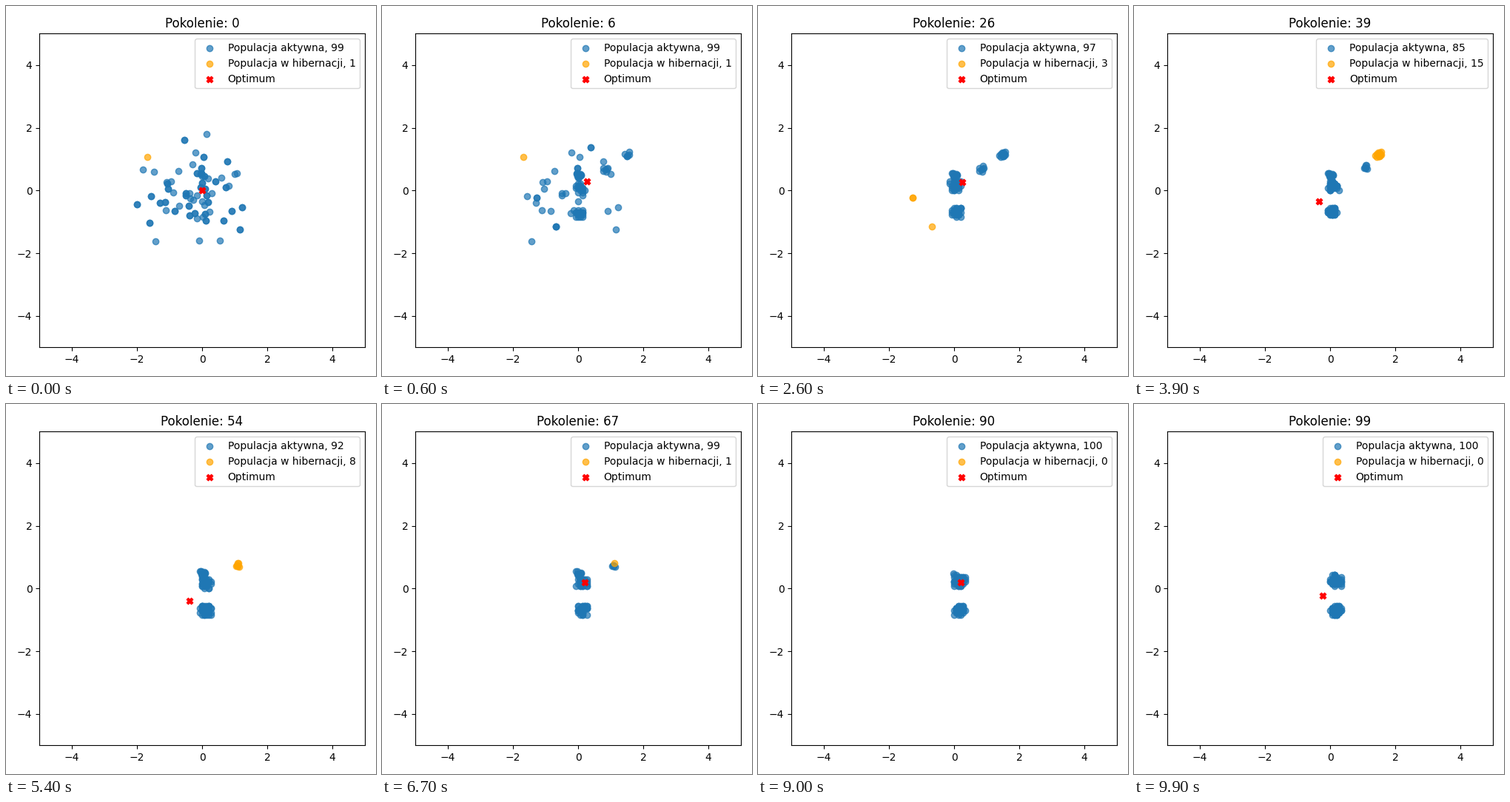
Write a matplotlib script that moves like this. It is 500x500 px and loops after 10 s.

```python
import matplotlib.pyplot as plt
import numpy as np
from matplotlib.animation import FuncAnimation

SIZE = 100      # individuals
GENS = 100      # generations
FOUNDERS = 66   # distinct starting points, the rest are copies
RENEW = 12      # generations between new offspring in a core group
GRID = 0.07     # gene resolution
SLEEP, WAKE = 1.9, 1.05   # distances from the optimum

rng = np.random.default_rng(7)
cloud = np.clip(rng.normal(0, [0.85, 0.8], (FOUNDERS, 2)), -2, 2)
cloud = cloud[np.arange(SIZE) % FOUNDERS]
leave = 1 + (15 * rng.random(SIZE) ** 2).astype(int)
noise = np.clip(rng.normal(size=(GENS // RENEW + 2, SIZE, 2)), -1.8, 1.8)
phase = rng.integers(RENEW, size=SIZE)

# Side niches: x, y, spread, members, born, first and last death
NICHES = [
    (0.00, 0.50, 0.05, 12, 4, 60, 92),
    (1.50, 1.16, 0.06, 15, 5, 40, 52),
    (0.86, 0.69, 0.05, 7, 5, 28, 36),
    (1.08, 0.73, 0.05, 8, 30, 66, 82),
    (0.39, 1.37, 0.00, 2, 3, 16, 20),
    (-1.27, -0.22, 0.00, 2, 4, 33, 35),
    (-0.68, -1.15, 0.00, 3, 5, 20, 32),
    (-1.68, 1.07, 0.00, 1, 0, 18, 18),
]

home = np.zeros((SIZE, 2))
born = np.full(SIZE, GENS)
death = np.zeros(SIZE)
slot = SIZE
for x, y, spread, n, first, fade, end in NICHES:
    slot -= n
    who = np.arange(slot, slot + n)
    home[who] = (x, y) + spread * noise[0, who]
    born[who] = first + np.arange(n) // 3
    death[who] = np.linspace(fade, end, n) if n > 1 else end


def optimum(gen):
    return 0.5 * np.sin(0.1 * gen)


def core(gen):
    """Two lasting groups that drift slowly to the right."""
    step = (gen + phase) // RENEW
    drift = 0.0015 * RENEW * step
    upper = np.arange(SIZE) % 2 == 0
    center = np.column_stack([0.02 + drift, np.where(upper, 0.1 + drift, -0.69)])
    pos = center + 0.09 * noise[step, np.arange(SIZE)]
    return np.round(pos / GRID) * GRID


def evolve():
    """Positions and hibernation flags for every generation."""
    asleep = np.zeros(SIZE, bool)
    for gen in range(GENS):
        settled = (born <= gen) & (gen < death)
        pos = np.where((gen < leave)[:, None], cloud, core(gen))
        pos[settled] = home[settled]
        dist = np.hypot(*(pos - optimum(gen)).T)
        asleep = settled & ((dist > SLEEP) | (asleep & (dist > WAKE)))
        yield pos, asleep


history = list(evolve())

fig, ax = plt.subplots(figsize=(5, 5), dpi=100)
ax.set(xlim=(-5, 5), ylim=(-5, 5))
title = ax.set_title("Pokolenie: 0")
fig.tight_layout()

active = ax.scatter([], [], color="tab:blue", alpha=0.7, label="Populacja aktywna")
hidden = ax.scatter([], [], color="orange", alpha=0.7, label="Populacja w hibernacji")
best = ax.scatter([], [], color="red", marker="X", label="Optimum")
legend = ax.legend(loc="upper right")
active_text, hidden_text, _ = legend.get_texts()


def update(gen):
    pos, asleep = history[gen]
    active.set_offsets(pos[~asleep])
    hidden.set_offsets(pos[asleep])
    best.set_offsets([[optimum(gen)] * 2])
    title.set_text(f"Pokolenie: {gen}")
    active_text.set_text(f"Populacja aktywna, {(~asleep).sum()}")
    hidden_text.set_text(f"Populacja w hibernacji, {asleep.sum()}")
    return active, hidden, best, title, legend


anim = FuncAnimation(fig, update, frames=GENS, interval=100, repeat=True, blit=False)
plt.show()
```
